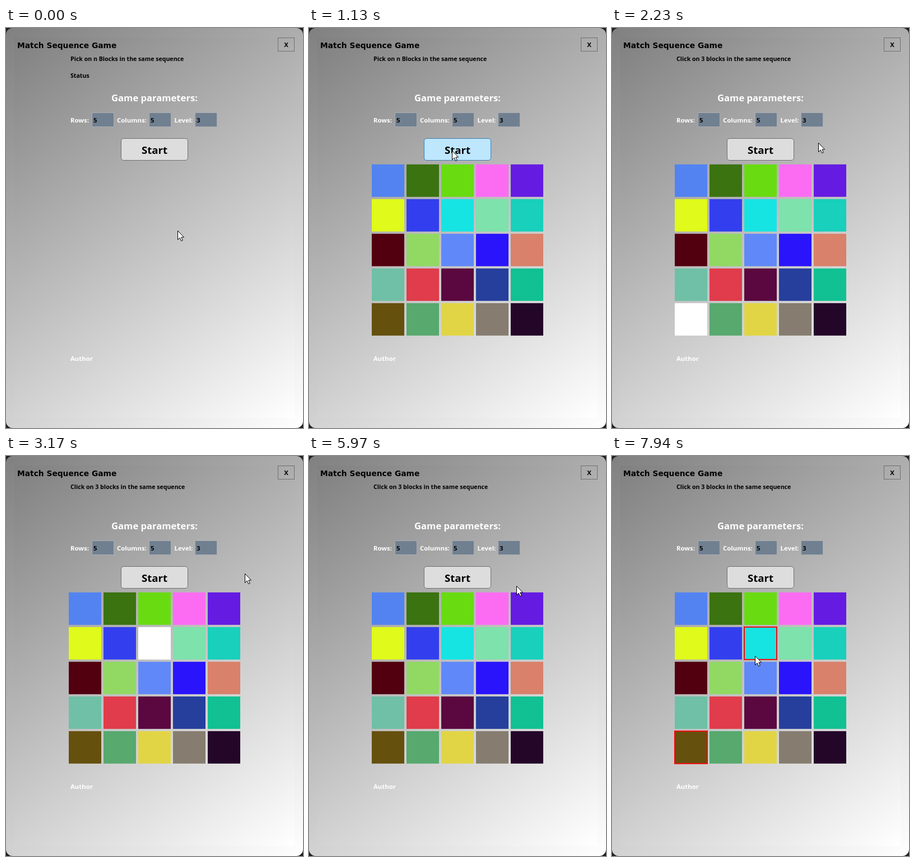
Write an HTML page that moves like this. It is 530x715 px and loops after 8000 ms.

```html
<!DOCTYPE html>
<html lang="en">
<head>
<meta charset="utf-8">
<title>Match Sequence Game</title>
<style>
  html, body { margin: 0; width: 100%; height: 100%; overflow: hidden; background: #202020; }
  .window, .panel, svg { position: absolute; }
  .window { width: 530px; height: 715px; border-radius: 12px; background: linear-gradient(143.45deg, #808080, #fff); }
  .panel { left: 15px; top: 17px; width: 500px; height: 680px; background: linear-gradient(143.67deg, #808080, #fff); }
  svg { left: 0; top: 0; }
  text { font: 700 11.4px "Open Sans", "Noto Sans", sans-serif; }
  .light { fill: #fff; }
  .box { fill: #708090; stroke: #abadb3; }
</style>
</head>
<body>
<div class="window"></div>
<div class="panel"></div>
<svg width="530" height="715" viewBox="0 0 530 715">
  <text x="20" y="36" style="font: 700 13.8px 'DejaVu Sans', sans-serif">Match Sequence Game</text>
  <rect x="485.5" y="17.5" width="29" height="24" fill="none" stroke="#707070"/>
  <text x="500" y="34" text-anchor="middle">X</text>
  <text id="hint" x="115" y="59" style="font-size: 10.6px"></text>
  <text id="status" x="115" y="89" style="font-size: 10.6px">Status</text>
  <text class="light" x="265" y="131" text-anchor="middle" style="font-size: 16.6px">Game parameters:</text>
  <g id="fields"></g>
  <rect id="button" x="205.5" y="197.5" width="119" height="39" rx="4.5"/>
  <text x="265" y="225" text-anchor="middle" style="font-size: 18.6px">Start</text>
  <g id="grid"></g>
  <text class="light" x="115" y="595">Author</text>
  <path id="cursor" d="M.5 .5v16l3.7-3.5 2.5 5.6 2.6-1.1-2.4-5.5h4.7z" fill="#fff" stroke="#000"/>
</svg>
<script>
const LOOP = 8000;
const COLORS = `5383f1 3b7310 68dc10 fc6cf3 651be2
  e0fa1b 333fee 16e4e3 7de2ab 18d0bc
  52000f 92d964 6188f8 2a14fb d9816b
  6fc0a6 e03c4b 5a083f 263f9d 11c193
  65500e 57a96e e1d545 867d70 230628`.split(/\s+/);

// Each cell of the sequence blinks twice: "period" on, off, on
const BLINKS = [
  { cell: 20, start: 1400, period: 365 },
  { cell: 7, start: 3170, period: 310 },
  { cell: 12, start: 4690, period: 313 }
];
const CLICKS = [{ cell: 20, time: 7060 }, { cell: 7, time: 7870 }];

const smooth = k => k * k * (3 - 2 * k);
const easeOut = k => 1 - (1 - k) ** 1.5;
const linear = k => k;

// Pointer strokes: cubic Bezier curves with easing
const STROKES = [
  { start: 40, end: 400, ease: smooth, x: [306, 290, 262, 255], y: [362, 320, 235, 219] },
  { start: 1400, end: 2770, ease: easeOut, x: [255, 255, 350, 426], y: [219, 270, 178, 210] },
  { start: 5750, end: 6660, ease: smooth, x: [426, 294, 200, 147], y: [210, 257, 320, 537] },
  { start: 6660, end: 6860, ease: linear, x: [147, 142, 132, 132], y: [537, 515, 522, 533] },
  { start: 7060, end: 7740, ease: smooth, x: [132, 165, 225, 254], y: [533, 480, 395, 335] },
  { start: 7740, end: 7870, ease: linear, x: [254, 254, 255, 255], y: [335, 342, 350, 357] }
];

const el = id => document.getElementById(id);

function add(parent, tag, attrs, text = "") {
  const node = document.createElementNS("http://www.w3.org/2000/svg", tag);
  for (const name in attrs) node.setAttribute(name, attrs[name]);
  node.textContent = text;
  return parent.appendChild(node);
}

for (const [label, x, boxX, value] of [["Rows:", 115, 153, 5], ["Columns:", 198, 255, 5], ["Level:", 300.5, 337, 3]]) {
  add(el("fields"), "text", { x, y: 169, class: "light" }, label);
  add(el("fields"), "rect", { x: boxX + .5, y: 151.5, width: 39, height: 25, class: "box" });
  add(el("fields"), "text", { x: boxX + 3, y: 169 }, value);
}

const cells = COLORS.map((color, i) => add(el("grid"), "rect", {
  x: 112, y: 243.8, width: 58, height: 58, "stroke-width": 2,
  transform: `translate(${i % 5 * 62} ${Math.floor(i / 5) * 62})`
}));

const bezier = ([a, b, c, d], u) =>
  a * (1 - u) ** 3 + 3 * b * (1 - u) ** 2 * u + 3 * c * (1 - u) * u * u + d * u ** 3;

function pointerAt(t) {
  const { start, end, ease, x, y } = STROKES.findLast(stroke => stroke.start <= t) || STROKES[0];
  const u = ease(Math.min(1, Math.max(0, (t - start) / (end - start))));
  return [Math.round(bezier(x, u)), Math.round(bezier(y, u))];
}

function draw(t) {
  const [x, y] = pointerAt(t);
  el("cursor").setAttribute("transform", `translate(${x} ${y})`);

  const hover = x >= 205 && x < 325 && y >= 197 && y < 237;
  const pressed = t >= 930 && t < 1130;
  const [fill, stroke] = pressed ? ["#c4e5f6", "#2c628b"] : hover ? ["#bee6fd", "#3c7fb1"] : ["#ddd", "#707070"];
  el("button").setAttribute("fill", fill);
  el("button").setAttribute("stroke", stroke);

  el("hint").textContent = t < 1200 ? "Pick on n Blocks in the same sequence" : "Click on 3 blocks in the same sequence";
  el("status").style.display = t < 1130 ? "" : "none";
  el("grid").style.display = t < 1130 ? "none" : "";

  cells.forEach((cell, i) => {
    const lit = BLINKS.some(b => b.cell === i && [0, 2].includes(Math.floor((t - b.start) / b.period)));
    const clicked = CLICKS.some(c => c.cell === i && t >= c.time);
    cell.setAttribute("fill", lit ? "#fff" : "#" + COLORS[i]);
    cell.setAttribute("stroke", clicked ? "#f00a0a" : "none");
  });
}

function tick() {
  draw(performance.now() % LOOP);
  requestAnimationFrame(tick);
}
tick();
</script>
</body>
</html>
```
